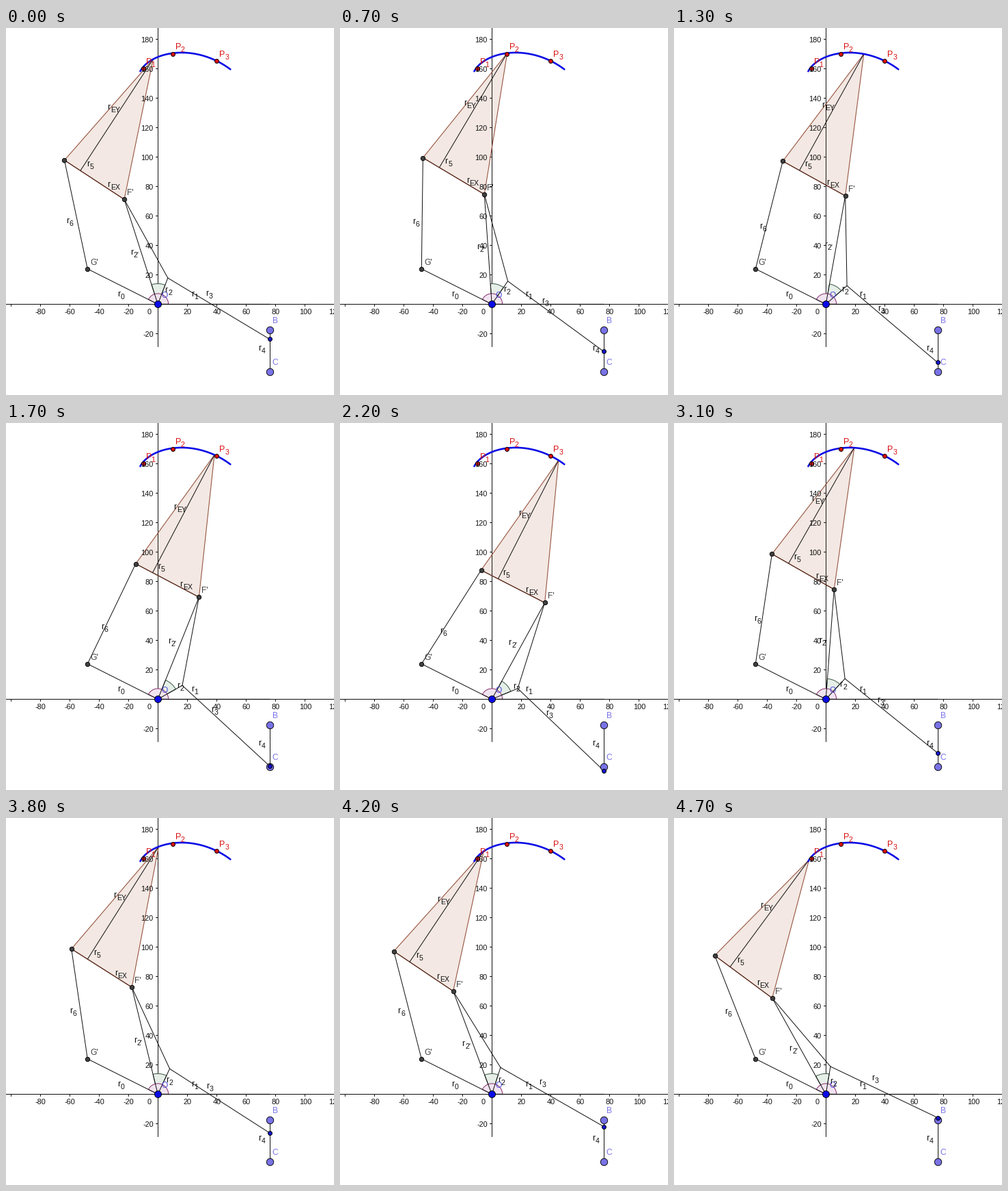
Write a matplotlib script that moves like this. It is 480x536 px and loops after 4.8 s.

```python
import numpy as np
import matplotlib.pyplot as plt
from matplotlib.animation import FuncAnimation
from matplotlib.patches import Wedge

W, H, DPI = 480, 536, 64
PX = 72 / DPI                       # points per pixel
FRAMES, STEP = 48, 100

plt.rcParams["font.family"] = "Liberation Sans"

UNIT = 2.152
O = np.array([222.4, 403.8])
G = np.array([119.5, 352.2])
SLIDER_X = 385.9
R1, R2, R3, R5, R6 = 41.0, 160.8, 173.6, 104.6, 162.3
FOOT, HEIGHT, SPREAD = 0.267, 194.4, 38.7

BLACK, GRAY = "#111111", "#404040"
BROWN, RED, BLUE = "#96543f", "#d80f0f", "#0a0ae6"
LILAC = "#7872e6"

# rocker angle in degrees: down, sharp turn, up
KEY_T = [0, 7, 13, 20.6, 22, 31, 38, 47]
KEY_A = [107.8, 93.9, 79.8, 57.4, 61.2, 85.7, 103.7, 119.2]


def polar(r, deg):
    a = np.radians(deg)
    return O + r * np.array([np.cos(a), -np.sin(a)])


def normal(p, q):
    d = (q - p) / np.hypot(*(q - p))
    return np.array([d[1], -d[0]])


def solve(deg):
    """Joint positions for one rocker angle."""
    f, a = polar(R2, deg), polar(R1, deg - SPREAD)
    s = np.array([SLIDER_X, a[1] + np.sqrt(R3**2 - (SLIDER_X - a[0])**2)])
    d = np.hypot(*(f - G))
    u = (f - G) / d
    along = (R6**2 - R5**2 + d**2) / (2 * d)
    h = G + along * u + np.sqrt(R6**2 - along**2) * np.array([u[1], -u[0]])
    foot = h + FOOT * (f - h)
    tip = foot + HEIGHT * normal(h, f)
    return f, a, s, h, foot, tip


fig = plt.figure(figsize=(W / DPI, H / DPI), dpi=DPI, facecolor="white")
ax = fig.add_axes([0, 0, 1, 1])
ax.set_xlim(0.2, W + 0.2)
ax.set_ylim(H + 0.4, 0.4)
ax.axis("off")


def line(*pts, color=BLACK, lw=1.0, z=3):
    xs, ys = zip(*pts) if pts else ((), ())
    return ax.plot(xs, ys, color=color, lw=lw * PX, zorder=z,
                   solid_capstyle="round")[0]


def dot(p, r, color, z=6):
    return ax.plot([p[0]], [p[1]], "o", ms=2 * r * PX, mfc=color,
                   mec="black", mew=0.9 * PX, zorder=z)[0]


def text(x, y, s, size, color=BLACK, ha="left"):
    return ax.text(x, y, s, fontsize=size * PX, color=color, ha=ha,
                   va="baseline", zorder=8)


class Label:
    """Letter with a subscript."""

    def __init__(self, main, sub, pos=(0, 0), color=BLACK, gap=4.6):
        self.gap = gap
        self.main = text(0, 0, main, 12.5, color)
        self.sub = text(0, 0, sub, 10.5, color)
        self.move(pos)

    def move(self, pos):
        x, y = pos
        self.main.set_position((x, y))
        self.sub.set_position((x + self.gap, y + 4))


def draw_axes():
    line((-2, O[1]), (W + 2, O[1]), z=1)
    line((O[0], -2), (O[0], 465), z=1)
    for v in range(-100, 121, 20):
        x = O[0] + v * UNIT
        line((x, O[1]), (x, O[1] + 3), z=1)
        if v and v > -100:
            text(x + 0.6, 418, str(v), 11, ha="center")
    for v in range(-20, 181, 20):
        y = O[1] - v * UNIT
        line((O[0] - 3, y), (O[0], y), z=1)
        if v:
            text(216, y + 4.5, str(v), 11, ha="right")
    text(213.2, 418, "0", 11, ha="right")


draw_axes()

# fixed links, curve and points
line(O, (SLIDER_X, O[1]), lw=1.3)
line(G, O)
line((SLIDER_X, 441), (SLIDER_X, 502))
line(*[solve(d)[5] for d in np.linspace(57, 120.4, 80)],
     color=BLUE, lw=2.6, z=4)
for i, (x, y) in enumerate([(-10, 160), (10, 170), (40, 165)], 1):
    p = O + UNIT * np.array([x, -y])
    dot(p, 3, RED)
    Label("P", str(i), p + (4, -6.5), RED, 8)
dot(G, 3.2, GRAY)
dot(O, 5, BLUE, 7)
text(G[0] + 4.5, G[1] - 6, "G'", 12, GRAY)
text(227.5, 394.5, "O", 12, "#4a4ad8")
for name, y in (("B", 441), ("C", 502)):
    dot((SLIDER_X, y), 5.2, LILAC)
    text(390, y - 9.5, name, 12, LILAC)
Label("r", "0", (163, 392))
Label("r", "1", (271, 392))
Label("r", "4", (369, 471))

g_deg = np.degrees(np.arctan2(O[1] - G[1], G[0] - O[0]))
ax.add_patch(Wedge(O, 15.5, -g_deg, 0, fc="#f0e4f0", ec="#8a3070",
                   lw=PX, zorder=2.5))
spread = ax.add_patch(Wedge(O, 30, -90, -50, fc="#e6eee8", ec="#3c5a46",
                            lw=PX, zorder=2))

# moving parts
plate = ax.fill([0], [0], fc=(0.6, 0.2, 0, 0.11), ec=BROWN, lw=1.1 * PX,
                zorder=3)[0]
links = [line() for _ in range(6)]
base = line(color="#50251a", lw=1.1)
joints = [dot((0, 0), 3.2, GRAY) for _ in range(2)]
slider = dot((0, 0), 3, "#1414c8", 7)
f_label = text(0, 0, "F'", 12, GRAY)
tags = {s: Label("r", s) for s in ("EX", "EY", "5", "6", "2'", "2", "3")}


def put(artist, *pts):
    artist.set_data(*zip(*pts))


def update(i):
    deg = np.interp(i, KEY_T, KEY_A)
    f, a, s, h, foot, tip = solve(deg)
    plate.set_xy([h, f, tip])
    ends = [(O, f), (O, a), (a, f), (a, s), (h, G), (foot, tip)]
    for link, (p, q) in zip(links, ends):
        put(link, p, q)
    put(base, h, f)
    put(joints[0], f)
    put(joints[1], h)
    put(slider, s)
    spread.set_theta1(-deg)
    spread.set_theta2(SPREAD - deg)
    f_label.set_position(f + (4, -6))
    spots = {"EX": (foot, f, -1.5, 16.5), "EY": (foot, tip, -0.5, 1),
             "5": (h, foot, 12, 15), "6": (h, G, -30, 15.5),
             "2'": (O, f, -0.5, -1), "2": (O, a, 18, 7.5),
             "3": (s, a, -11, -32)}
    for key, (p, q, dx, dy) in spots.items():
        tags[key].move((p + q) / 2 + 16 * normal(p, q) + (dx, dy))
    return []


anim = FuncAnimation(fig, update, frames=FRAMES, interval=STEP,
                     repeat=True, repeat_delay=0, blit=False)
plt.show()
```
